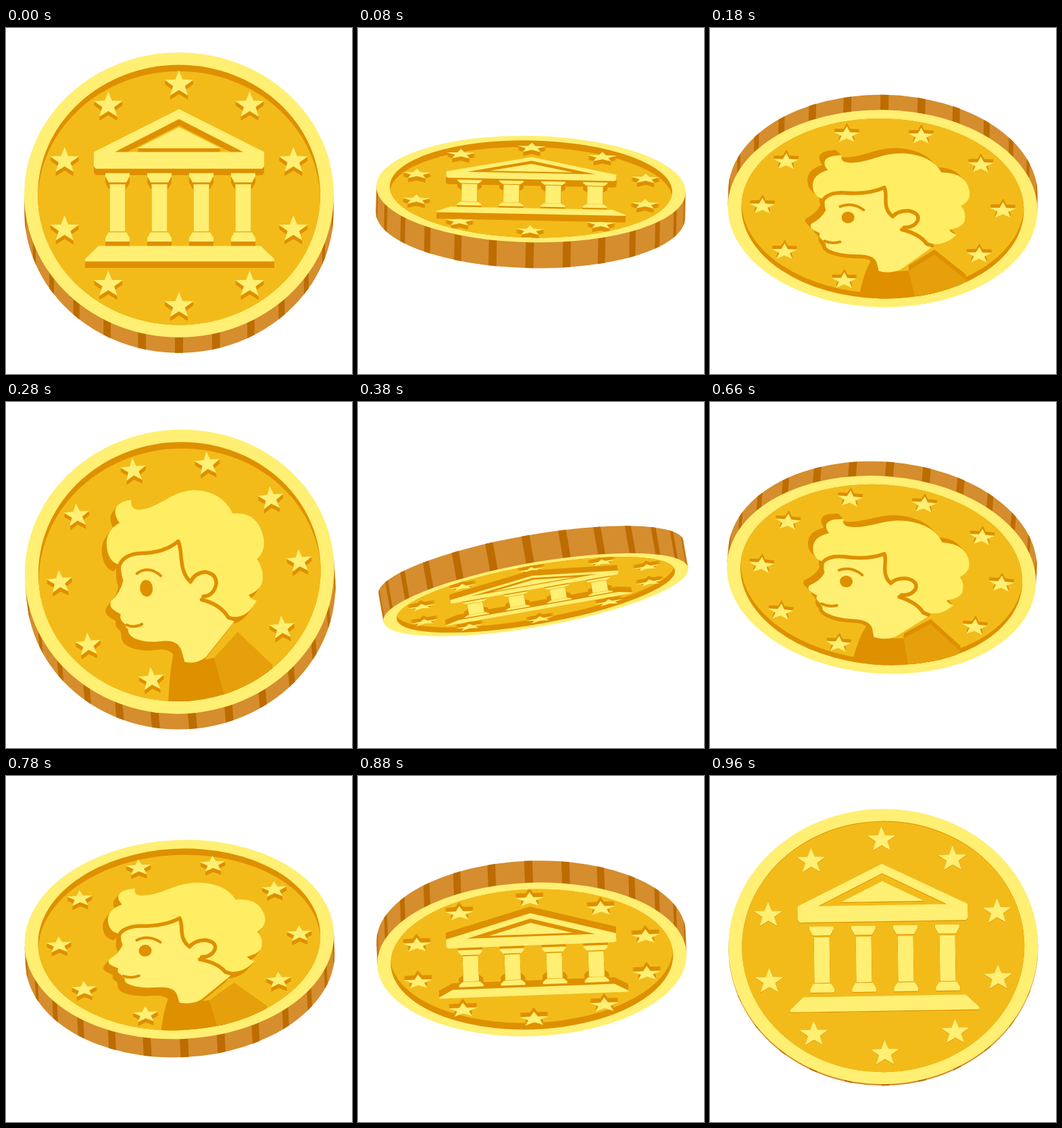
These frames come from a looping animation (512 by 512 pixels, 0.98 s). An HTML page with a canvas:

```html
<!DOCTYPE html>
<html lang="en">
<head>
<meta charset="utf-8">
<title>Coin flip</title>
<style>
  html, body { margin: 0; width: 100%; height: 100%; overflow: hidden; background: #fff; }
  canvas { display: block; width: 100vmin; height: 100vmin; }
</style>
</head>
<body>
<canvas id="stage" width="512" height="512"></canvas>
<script>
const ctx = document.getElementById('stage').getContext('2d');
const LOOP = 980, STEP = 20, R = 229, INNER = 209, THICK = 42;
const LIGHT = '#ffef72', HAIR = '#ffee64', FIELD = '#f2bb1a', SHADE = '#de9000',
      PANEL = '#e6a00c', SIDE = '#d58d2e', STRIPE = '#bc6c00';

// time, flip angle, thickness bias, centre y, screen tilt, squash
const KEYS = [
  [0, 23, 6.6, 258.5, 0, 1],
  [180, 129.6, -10, 256, 1, 1],
  [380, 282, 0, 265, -10, 1],
  [470, 355, 2, 236, -1.2, 1],
  [500, 378.6, 5.6, 243.5, -.4, 1],
  [660, 489.6, -11, 245, 4.5, 1],
  [720, 540, -3, 238, 1, 1],
  [780, 590, 5, 255.5, -2.7, 1],
  [960, 721, 1.5, 253.5, -.9, .889]
];
const TURN = [LOOP, 720, 0, 0, 0, 0];

function key(i) {
  const n = KEYS.length, laps = Math.floor(i / n);
  return KEYS[i - laps * n].map((v, c) => v + laps * TURN[c]);
}

// Smooth cubic through the keys, continuous over the loop
function pose(t) {
  const i = KEYS.findLastIndex(k => k[0] <= t);
  const [a, b, c, d] = [-1, 0, 1, 2].map(o => key(i + o));
  const span = c[0] - b[0], u = (t - b[0]) / span;
  return b.map((v, j) => {
    const m0 = (c[j] - a[j]) / (c[0] - a[0]) * span;
    const m1 = (d[j] - v) / (d[0] - b[0]) * span;
    const e = c[j] - v;
    return v + u * (m0 + u * (3 * e - 2 * m0 - m1 + u * (m0 + m1 - 2 * e)));
  });
}

const rad = deg => deg * Math.PI / 180;

function disc(r, s, y, color) {
  ctx.beginPath();
  ctx.ellipse(0, y, r, r * s, 0, 0, 2 * Math.PI);
  ctx.fillStyle = color;
  ctx.fill();
}

function starPath(angle, size) {
  const x = 178 * Math.cos(rad(angle)), y = 178 * Math.sin(rad(angle));
  const points = Array.from({ length: 10 }, (_, i) => {
    const r = size * (i % 2 ? .41 : 1), a = rad(i * 36 - 90);
    return [x + r * Math.cos(a), y + r * Math.sin(a)];
  });
  return 'M' + points.join('L') + 'Z';
}

const stars = (first, size, skip) => new Path2D(
  Array.from({ length: 10 }, (_, i) => i === skip ? '' : starPath(first + i * 36, size)).join(''));

const columnsPath = [-91, -29, 33, 95].map(x =>
  `M${x - 18} -35h36v5l-5 10h-26l-5 -10zM${x - 11.5} -17h23v76h-23z` +
  `M${x - 13} 60h26l5 9v6h-36v-6z`).join('');

const temple = new Path2D(
  'M0 -138L126 -69V-46L123 -42H-123L-126 -46V-69Z' +
  'M0 -122L-95 -69H95ZM0 -109L62 -75H-62Z' + columnsPath +
  'M-119 82H121L141 103V107H-139V103Z');

const jaw = 'Q-87 95 -78 102Q-63 113 -36 112Q-14 111 -10 127L-7 144';
const fringe = 'Q-80 -36 -56 -35Q-20 -32 2 -49C8 -32 -2 -2 15 18';
const face = new Path2D(
  'M-84 -30Q-88 -8 -84 6Q-90 26 -105 38Q-109 47 -100 54L-92 60Q-95 67 -90 73' +
  'Q-85 78 -86 85' + jaw + 'Q10 153 28 141L74 88L64 0L0 -60Z');
const hair = new Path2D(
  'M-62 -122Q-84 -121 -87 -107Q-88 -96 -82 -87Q-104 -76 -104 -52Q-104 -26 -89 -20' +
  fringe + 'Q22 4 38 3Q56 8 53 28Q48 44 34 49' +
  'Q58 60 66 78Q92 88 110 57Q103 56 99 47Q123 39 122 18Q123 4 116 -9' +
  'Q131 -23 128 -45Q122 -87 86 -86Q72 -125 31 -129C-4 -130 -18 -107 -49 -105Q-65 -105 -62 -122Z');
const ear = new Path2D('M15 20Q22 4 38 5Q56 9 52 27Q46 45 32 41Z');
const outlines = new Path2D(
  'M-88 -18' + fringe + 'Q22 4 38 4Q56 9 52 27Q46 44 32 43' +
  'M29 48Q56 58 66 80L74 84M-86 86' + jaw);
const features = new Path2D('M-85 78Q-74 85 -62 79M-63 -3Q-45 -15 -28 4');
const collar = new Path2D('M-16 122Q-26 145 -34 215H60L40 143L14 146Z');
const shoulder = new Path2D('M40 143L78 105L125 162L110 215H52Z');

// Fill a path in face coordinates, shifted on screen
function paint(path, s, color, dx = 0, dy = 0) {
  ctx.save();
  ctx.translate(dx, dy);
  ctx.scale(1, s);
  ctx.fillStyle = color;
  ctx.fill(path, 'evenodd');
  ctx.restore();
}

// Stroke a flattened path with an even line
function line(path, s, width) {
  const flat = new Path2D();
  flat.addPath(path, new DOMMatrix([1, 0, 0, s, 0, 0]));
  ctx.strokeStyle = SHADE;
  ctx.lineWidth = width;
  ctx.lineCap = ctx.lineJoin = 'round';
  ctx.stroke(flat);
}

function extrude(path, s, depth, dx = 0) {
  for (let i = 8; i > 0; i--) paint(path, s, SHADE, dx * i / 8, depth * i / 8);
}

function raise(path, s, depth, color = LIGHT) {
  extrude(path, s, depth);
  paint(path, s, color);
}

const headStars = stars(-90, 22.5), tailStars = stars(0, 20, 2);

function drawHeads(s, depth) {
  raise(headStars, s, depth * .65);
  raise(temple, s, depth);
}

function drawTails(s, depth) {
  raise(tailStars, s, depth * .65);
  paint(collar, s, SHADE);
  raise(shoulder, s, depth, PANEL);
  for (const part of [face, hair]) extrude(part, s, depth, -8);
  paint(face, s, LIGHT);
  paint(hair, s, HAIR);
  paint(ear, s, LIGHT);
  line(outlines, s, 5.5);
  line(features, s, 4);
  ctx.beginPath();
  ctx.ellipse(-51, 22 * s, 9.5, 13.5 * s, 0, 0, 2 * Math.PI);
  ctx.fillStyle = SHADE;
  ctx.fill();
}

function drawEdge(s, d) {
  disc(R, s, d, SIDE);
  ctx.fillRect(-R, Math.min(0, d), 2 * R, Math.abs(d));
  ctx.fillStyle = STRIPE;
  const side = Math.sign(d);
  for (let i = -6; i <= 6; i++) {
    const [a, b] = [-1.5, 1.5].map(w => rad(i * 360 / 26 + w));
    const at = q => [R * Math.sin(q), side * R * s * Math.cos(q)];
    const [x0, y0] = at(a), [x1, y1] = at(b);
    ctx.beginPath();
    ctx.moveTo(x0, y0);
    ctx.lineTo(x1, y1);
    ctx.lineTo(x1, y1 + d);
    ctx.lineTo(x0, y0 + d);
    ctx.fill();
  }
}

function draw(t) {
  const [, flip, bias, y, tilt, squash] = pose(t);
  const cos = Math.cos(rad(flip)), heads = cos > 0;
  const s = Math.max(.004, Math.abs(cos) * Math.min(1, squash));
  const d = (heads ? 1 : -1) * (THICK * Math.sin(rad(flip)) + bias);
  const depth = d * .43 * Math.sqrt(s);

  ctx.clearRect(0, 0, 512, 512);
  ctx.save();
  ctx.translate(256 - tilt * .35, y);
  ctx.rotate(rad(tilt));
  ctx.translate(0, -d / 2);
  drawEdge(s, d);
  disc(R, s, 0, LIGHT);
  disc(INNER, s, 0, SHADE);
  ctx.clip();
  disc(INNER, s, depth, FIELD);
  (heads ? drawHeads : drawTails)(s, depth);
  ctx.restore();
}

function tick() {
  const t = performance.now() % LOOP;
  draw(Math.floor(t / STEP) * STEP);
  requestAnimationFrame(tick);
}
tick();
</script>
</body>
</html>
```
